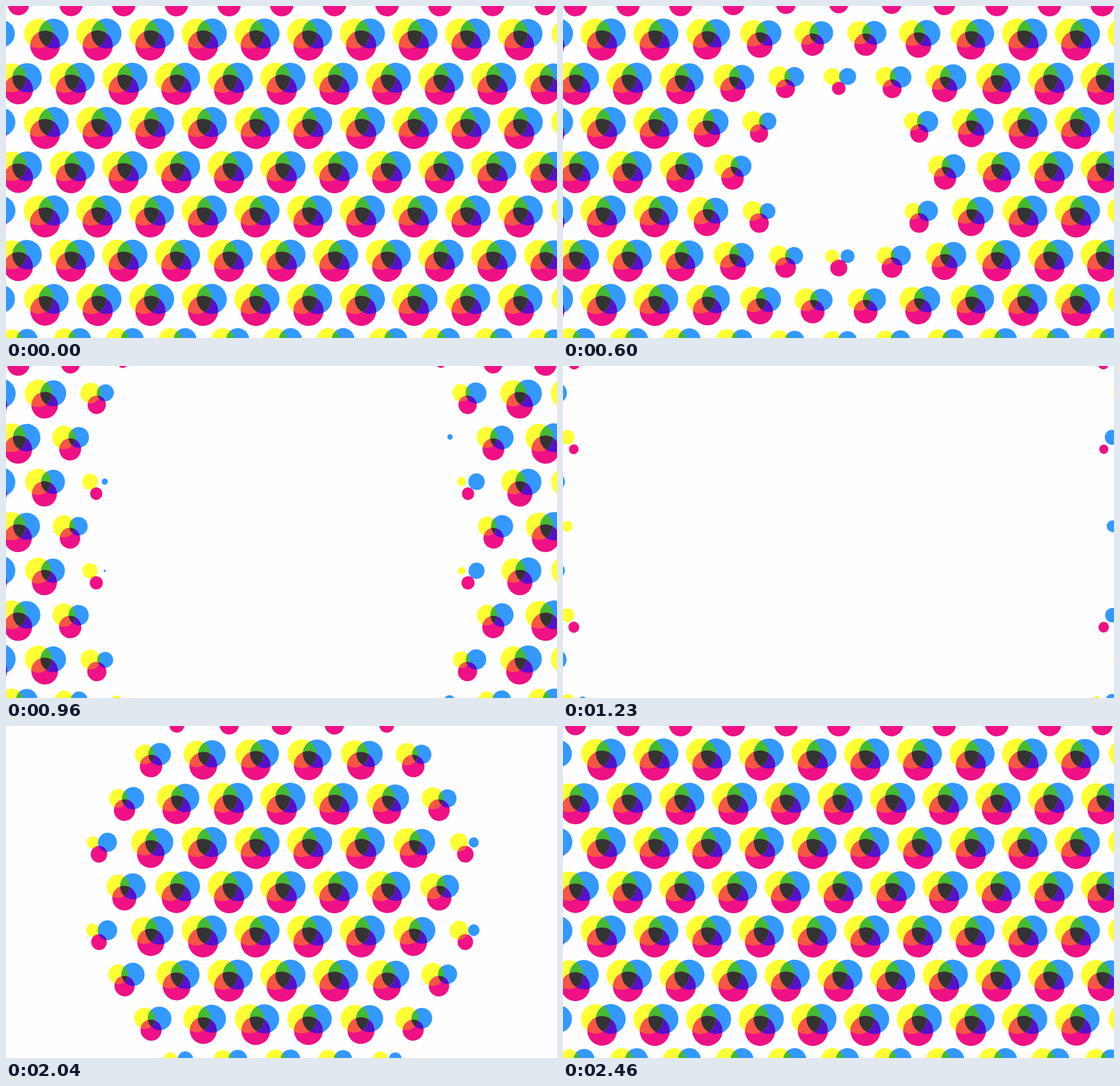
These frames come from a looping animation (960x578 px, 2520 ms). An HTML page with a canvas:

```html
<!DOCTYPE html>
<html lang="en">
<head>
<meta charset="utf-8">
<title>Ink dots</title>
<style>
html, body { margin: 0; width: 100%; height: 100%; overflow: hidden; background: #fefefe; }
canvas { display: block; }
</style>
</head>
<body>
<canvas id="stage" width="960" height="578"></canvas>
<script>
const ctx = document.getElementById("stage").getContext("2d");
const WIDTH = 960, HEIGHT = 578, LOOP = 2520;
const PITCH_X = 91.8, PITCH_Y = 77, RADIUS = 26.2, STAGGER = 0.507;
const CENTER = { x: 481, y: 289 };
const PAPER = "#fefefe";
const INK = {
  yellow: "#ffff33", blue: "#3399ff", magenta: "#ef1185",
  green: "#44bb33", red: "#f75546", purple: "#5510cc", black: "#333333"
};
const OFFSETS = [[-11.7, -10], [14.6, -10], [-0.5, 10.8]];

const clamp = (v, lo, hi) => Math.min(hi, Math.max(lo, v));

// Distance in which height counts less and less away from the centre.
function waveDistance(dx, dy, reach, floor) {
  const weight = Math.max(floor, 1 - Math.hypot(dx, dy) / reach);
  return Math.sqrt(dx * dx + weight * dy * dy);
}

// A wave has a front, a width and a radial push; phase 0 is empty, 1 is full.
function waveAt(t) {
  if (t < 1260) {
    const front = 0.56 * (t - 960) + 309;
    const width = 260;
    const phase = (dx, dy) => (waveDistance(dx, dy, 640, 0.42) - front) / width;
    return { phase, width, push: 3 };
  }
  const s = t - 1470;
  if (s < 0) return null;
  const front = 30 + 0.55 * s + 106 * (s / 990) ** 5;
  const width = 110 + 0.26 * front;
  const phase = (dx, dy) => (front - waveDistance(dx, dy, 1000, 0.6)) / width;
  return { phase, width, push: -Math.min(12, 1000 / front) };
}

function dotPath(x, y, wave) {
  const path = new Path2D();
  const dx = x - CENTER.x, dy = y - CENTER.y;
  const q = clamp(wave.phase(dx, dy), 0, 1);
  // Dots beyond the top or bottom edge are drawn in and shrunk by the same amount.
  const inset = 0.7 * Math.max(0, -y, y - HEIGHT);
  const r = RADIUS * (1 - (1 - q) ** 2) ** 0.4 - inset;
  if (q === 0 || r <= 0) return path;
  const shift = wave.push * (1 - q) ** 2;
  const squash = 1 - 2 * Math.abs(wave.push) * (1 - q) / wave.width;
  const angle = Math.atan2(dy, dx);
  path.ellipse(x + shift * Math.cos(angle),
    y + shift * Math.sin(angle) - inset * Math.sign(dy),
    r * squash, r, angle, 0, 2 * Math.PI);
  return path;
}

function fill(path, color) {
  ctx.fillStyle = color;
  ctx.fill(path);
}

function drawCluster(x, y, wave) {
  const [yellow, blue, magenta] = OFFSETS.map(([ox, oy]) => dotPath(x + ox, y + oy, wave));
  fill(yellow, INK.yellow);
  fill(blue, INK.blue);
  fill(magenta, INK.magenta);
  ctx.save();
  ctx.clip(magenta);
  fill(blue, INK.purple);
  ctx.restore();
  ctx.save();
  ctx.clip(yellow);
  fill(blue, INK.green);
  fill(magenta, INK.red);
  ctx.clip(blue);
  fill(magenta, INK.black);
  ctx.restore();
}

function heldTime(t) {
  if (t < 30 || t > 2460) return 2460;
  if (t > 510 && t < 600) return 510;
  return t;
}

function draw(t) {
  ctx.fillStyle = PAPER;
  ctx.fillRect(0, 0, WIDTH, HEIGHT);
  const wave = waveAt(heldTime(t));
  if (!wave) return;
  for (let row = -4; row <= 4; row++) {
    const stagger = row % 2 ? STAGGER : 0;
    for (let col = -6; col <= 6; col++) {
      drawCluster(CENTER.x + (col + stagger) * PITCH_X, CENTER.y + row * PITCH_Y, wave);
    }
  }
}

const start = performance.now();
function tick() {
  draw((performance.now() - start) % LOOP);
  requestAnimationFrame(tick);
}
tick();
</script>
</body>
</html>
```
